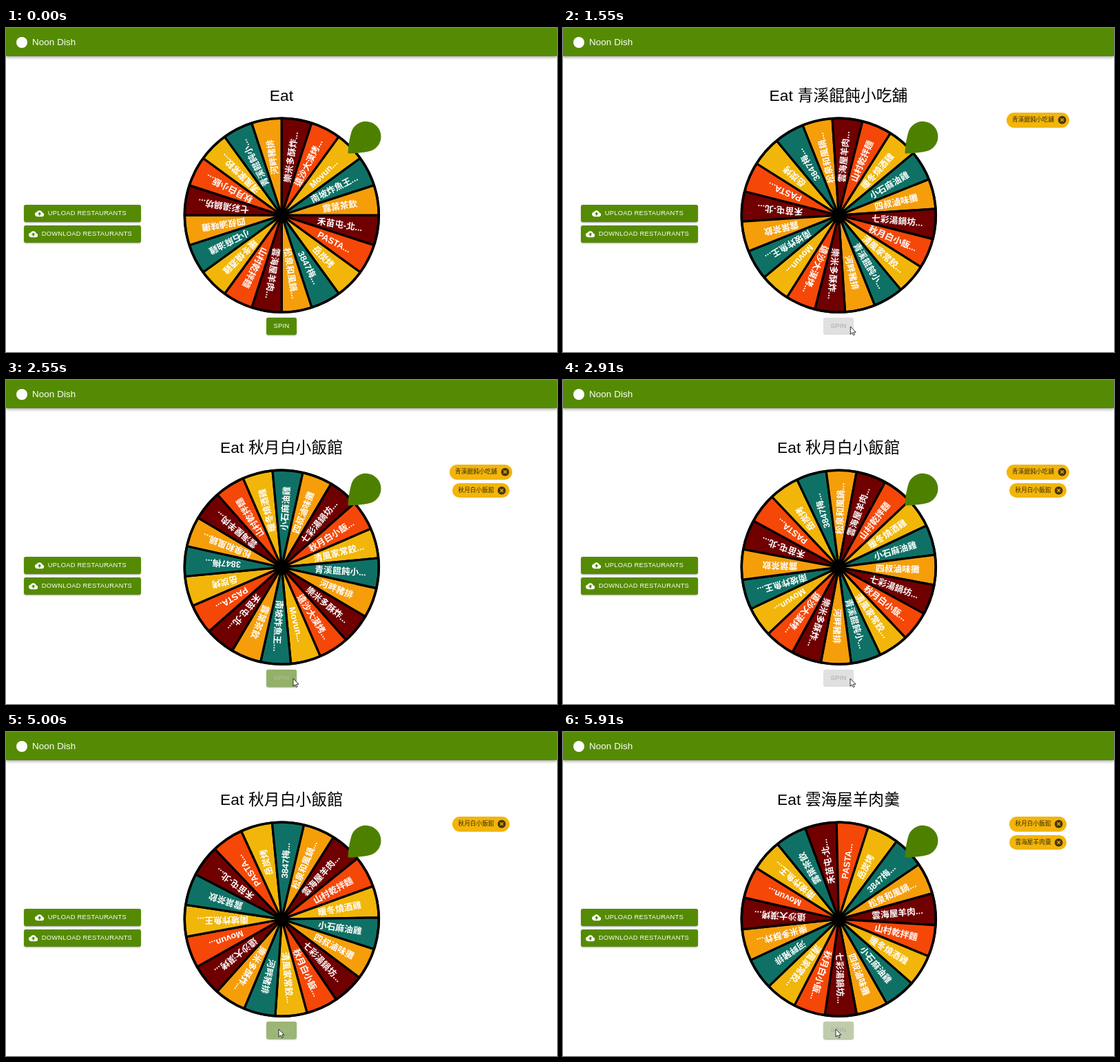
An HTML page that plays this animation: 800x471 px, repeating every 6 s.

```html
<!DOCTYPE html>
<html lang="zh-Hant">
<head>
<meta charset="utf-8">
<title>Noon Dish</title>
<style>
html, body { margin: 0; width: 100%; height: 100%; overflow: hidden; background: #fff; }
body, text { font-family: "Liberation Sans", Arial, "Noto Sans CJK TC", "Noto Sans CJK", sans-serif; }
#stage { position: absolute; left: 0; top: 0; width: 800px; height: 471px; overflow: hidden; }
#stage > * { position: absolute; white-space: nowrap; }
#bar { left: 0; top: 0; width: 800px; height: 41.3px; background: #558b04;
  box-shadow: 0 1.3px 2.7px -.7px rgba(0,0,0,.2), 0 2.7px 3.3px rgba(0,0,0,.14), 0 .7px 6.7px rgba(0,0,0,.12); }
#mark { left: 14.5px; top: 12.5px; width: 16px; height: 16px; border-radius: 50%; background: #fff; }
#name { left: 38px; top: 10px; font-size: 13.4px; line-height: 21px; letter-spacing: .1px; color: #fff; }
#title { left: 0; top: 82px; width: 800px; text-align: center; font-size: 22.7px; line-height: 32px;
  letter-spacing: .16px; font-weight: 300; color: #000; }
.btn { box-sizing: border-box; height: 24.6px; line-height: 24.6px; border-radius: 2.7px; background: #558b04;
  color: #fff; font-size: 9.3px; letter-spacing: .27px;
  box-shadow: 0 2px 1.3px -1.3px rgba(0,0,0,.2), 0 1.3px 1.3px rgba(0,0,0,.14), 0 .7px 3.3px rgba(0,0,0,.12); }
.wide { left: 25.5px; width: 170px; }
.wide svg { position: absolute; top: 5.6px; }
.wide span { position: absolute; }
#spin { left: 378px; top: 421.3px; width: 44px; text-align: center; }
#chips { left: 640px; top: 123.3px; width: 99px; }
.chip { position: relative; box-sizing: border-box; width: max-content; height: 21.4px; margin: 0 auto 5.4px; padding: 0 22px 0 8px;
  border-radius: 11px; background: #f2b50a; color: #3b2d03; font-size: 8.7px; line-height: 21.4px; }
.chip svg { position: absolute; right: 4px; top: 3.6px; }
#art { left: 0; top: 0; }
</style>
</head>
<body>
<div id="stage">
  <div id="bar"></div>
  <div id="mark"></div>
  <div id="name">Noon Dish</div>
  <div id="title"></div>
  <div class="btn wide" style="top:257.3px" data-x="16" data-label="UPLOAD RESTAURANTS"></div>
  <div class="btn wide" style="top:287.3px" data-x="7" data-label="DOWNLOAD RESTAURANTS"></div>
  <div class="btn" id="spin">SPIN</div>
  <div id="chips"></div>
  <svg id="art" width="800" height="471" viewBox="0 0 800 471">
    <g id="wheels"></g>
    <path fill="#4e8000" d="M496.5 182.5C497 172 498 164 501 153A22 22 0 1 1 526 179.5C514 182 506 182 496.5 182.5Z"/>
    <g id="cursor" fill="#fff" stroke="#000" stroke-width=".8" stroke-linejoin="round">
      <path id="arrow" d="M0 0V11.2L2.6 8.8 4.4 12.6 6.2 11.8 4.5 8.2H8Z"/>
      <path id="hand" d="M-1 1Q-1 -1 .6 -1 2 -1 2 1V5L7 6Q8 6.5 8 8L7 14H-.5L-4 8.7Q-4 7 -2.5 7L-1 8.5Z"/>
    </g>
  </svg>
</div>
<script>
const $ = id => document.getElementById(id);
const LOOP = 6000, FPS = 11;
const CX = 400.3, CY = 272.2, R = 141;
const COLORS = ['#700000', '#f54707', '#f1b609', '#0f7165', '#f59e0a'];
const NAMES = ['禾苗屯-北門店', 'PASTA小屋', '岳炭烤', '3847梅子飲', '松泉和風鍋物', '雲海屋羊肉羹', '山村乾拌麵',
  '暖冬燒酒雞', '小石麻油雞', '四叔滷味攤', '七彩湯鍋坊本店', '秋月白小飯館', '清風家常餃館', '青溪餛飩小吃舖',
  '河畔豬排', '樂米多酥炸雞', '遠沙大漠烤肉', 'Movun Kitchen', '南坡炸魚王子', '露葉茶飲'];
const REMOVED = 13, REMOVE_AT = 3909;

// start, press, angle before, angle after
const SPINS = [
  [460.47, 460.47, 0, 72],
  [1432.47, 1432.47, 72, 108],
  [2502.81, 2502.81, 108, 69],
  [4872.54, 4952, 69, 210.8],
  [5836.37, 5836.37, 210.8, 210.8]
];
const RISE = 183, CRUISE = 53, FALL = 564, SPIN_TIME = RISE + CRUISE + FALL, FADE = 95;

// time, picks listed so far
const PICKS = [[0, []], [1260, [13]], [2232, [13, 11]], [3303, [13, 11, 13]], [REMOVE_AT, [11]], [5672, [11, 5]]];

// time, x, y
const PATH = [[90, 466, 441], [363, 424, 433], [455, 424, 433], [545, 418, 434], [1900, 417, 434], [3303, 417, 434],
  [3600, 720, 187], [4091, 720, 187], [4454, 411, 404], [4600, 411, 404], [4727, 396, 432]];

const clamp = v => Math.max(0, Math.min(1, v));
const mix = (a, b, p) => a + (b - a) * p;
const last = (rows, t) => rows.filter(r => r[0] <= t).pop();

function bezier(x1, y1, x2, y2) {
  const at = (a, b, u) => 3 * a * u * (1 - u) ** 2 + 3 * b * u * u * (1 - u) + u ** 3;
  return x => {
    let lo = 0, hi = 1;
    for (let i = 0; i < 40; i++) {
      const mid = (lo + hi) / 2;
      if (at(x1, x2, mid) < x) lo = mid; else hi = mid;
    }
    return at(y1, y2, lo);
  };
}
const speedUp = bezier(.71, 0, .96, .9);
const slowDown = bezier(0, 0, .35, 1.02);

function wheelAngle(t) {
  const spin = last(SPINS, t);
  if (!spin) return 0;
  const [start, , from, to] = spin, e = t - start;
  if (e < RISE) return from + 360 * speedUp(e / RISE);
  if (e < RISE + CRUISE) return from + 360 * (e - RISE) / CRUISE;
  return from + (1440 + to - from) * slowDown(clamp((e - RISE - CRUISE) / FALL));
}

function wheelMarkup(names) {
  const step = 360 / names.length, a = step * Math.PI / 180;
  const slice = `M0 0L${R} 0A${R} ${R} 0 0 1 ${R * Math.cos(a)} ${R * Math.sin(a)}Z`;
  const label = n => n.length > 5 ? n.slice(0, 5) + '...' : n;
  const slices = names.map((n, i) =>
    `<path d="${slice}" transform="rotate(${i * step})" fill="${COLORS[i % 5]}" stroke="#000" stroke-width="3.2" stroke-linejoin="bevel"/>`);
  const labels = names.map((n, i) =>
    `<text transform="rotate(${(i + .5) * step})" x="85.5" y="4.6">${label(n)}</text>`);
  return `<g fill="#fff" font-size="12.8" font-weight="700" text-anchor="middle">${slices.join('')}` +
    `<circle r="${R}" fill="none" stroke="#000" stroke-width="3.6"/>${labels.join('')}</g>`;
}

function buttonOff(t) {
  const spin = last(SPINS, t);
  if (!spin) return 0;
  const end = spin[0] + SPIN_TIME;
  return t < end ? clamp((t - spin[1]) / FADE) : 1 - clamp((t - end) / FADE);
}

function paintButton(p) {
  const style = $('spin').style;
  const ink = mix(255, 166, clamp(p * 1.8));
  style.background = `rgb(${mix(85, 224, p)},${mix(139, 224, p)},${mix(4, 224, p)})`;
  style.color = `rgb(${ink},${ink},${ink})`;
  style.boxShadow = p === 1 ? 'none' : '';
}

function moveCursor(t) {
  const i = PATH.filter(k => k[0] <= t).length - 1;
  $('cursor').style.display = i < 0 ? 'none' : '';
  if (i < 0) return;
  const a = PATH[i], b = PATH[i + 1] || a;
  const p = a === b ? 0 : (t - a[0]) / (b[0] - a[0]);
  $('cursor').setAttribute('transform', `translate(${mix(a[1], b[1], p)} ${mix(a[2], b[2], p)})`);
  const onChip = t >= 3600 && t < REMOVE_AT;
  $('hand').style.display = onChip ? '' : 'none';
  $('arrow').style.display = onChip ? 'none' : '';
}

const CROSS = '<svg width="13.4" height="13.4" viewBox="0 0 24 24"><circle cx="12" cy="12" r="10.6" fill="#49370a"/>' +
  '<path d="M8 8L16 16M16 8L8 16" stroke="#f2b50a" stroke-width="2.2"/></svg>';
let shown;
function showPicks(picks) {
  if (picks === shown) return;
  shown = picks;
  $('title').textContent = ['Eat', ...picks.slice(-1).map(i => NAMES[i])].join(' ');
  $('chips').innerHTML = picks.map(i => `<div class="chip">${NAMES[i]}${CROSS}</div>`).join('');
}

const CLOUD = 'M19.35 10.04C18.67 6.59 15.64 4 12 4 9.11 4 6.6 5.64 5.35 8.04 2.34 8.36 0 10.91 0 14c0 3.31 2.69 6 6 6h13' +
  'c2.76 0 5-2.24 5-5 0-2.64-2.05-4.78-4.65-4.96zM14 13v4h-4v-4H7l5-5 5 5h-3z';
for (const b of document.querySelectorAll('.wide')) {
  const x = +b.dataset.x;
  b.innerHTML = `<svg style="left:${x}px" width="13.4" height="13.4" viewBox="0 0 24 24"><path fill="#fff" d="${CLOUD}"/></svg>` +
    `<span style="left:${x + 19.3}px">${b.dataset.label}</span>`;
}
$('wheels').innerHTML = wheelMarkup(NAMES) + wheelMarkup(NAMES.filter((n, i) => i !== REMOVED));
const [fullWheel, shortWheel] = $('wheels').children;

function draw(t) {
  $('wheels').setAttribute('transform', `translate(${CX} ${CY}) rotate(${wheelAngle(t) % 360})`);
  fullWheel.style.display = t < REMOVE_AT ? '' : 'none';
  shortWheel.style.display = t < REMOVE_AT ? 'none' : '';
  showPicks(last(PICKS, t)[1]);
  paintButton(buttonOff(t));
  moveCursor(t);
}

// The picture advances in even steps, eleven a second.
const began = performance.now();
function tick() {
  const t = Math.max(0, performance.now() - began) % LOOP;
  const step = Math.floor((t + 5) * FPS / 1000) % (LOOP * FPS / 1000);
  draw(step * 1000 / FPS);
  requestAnimationFrame(tick);
}
tick();
</script>
</body>
</html>
```
